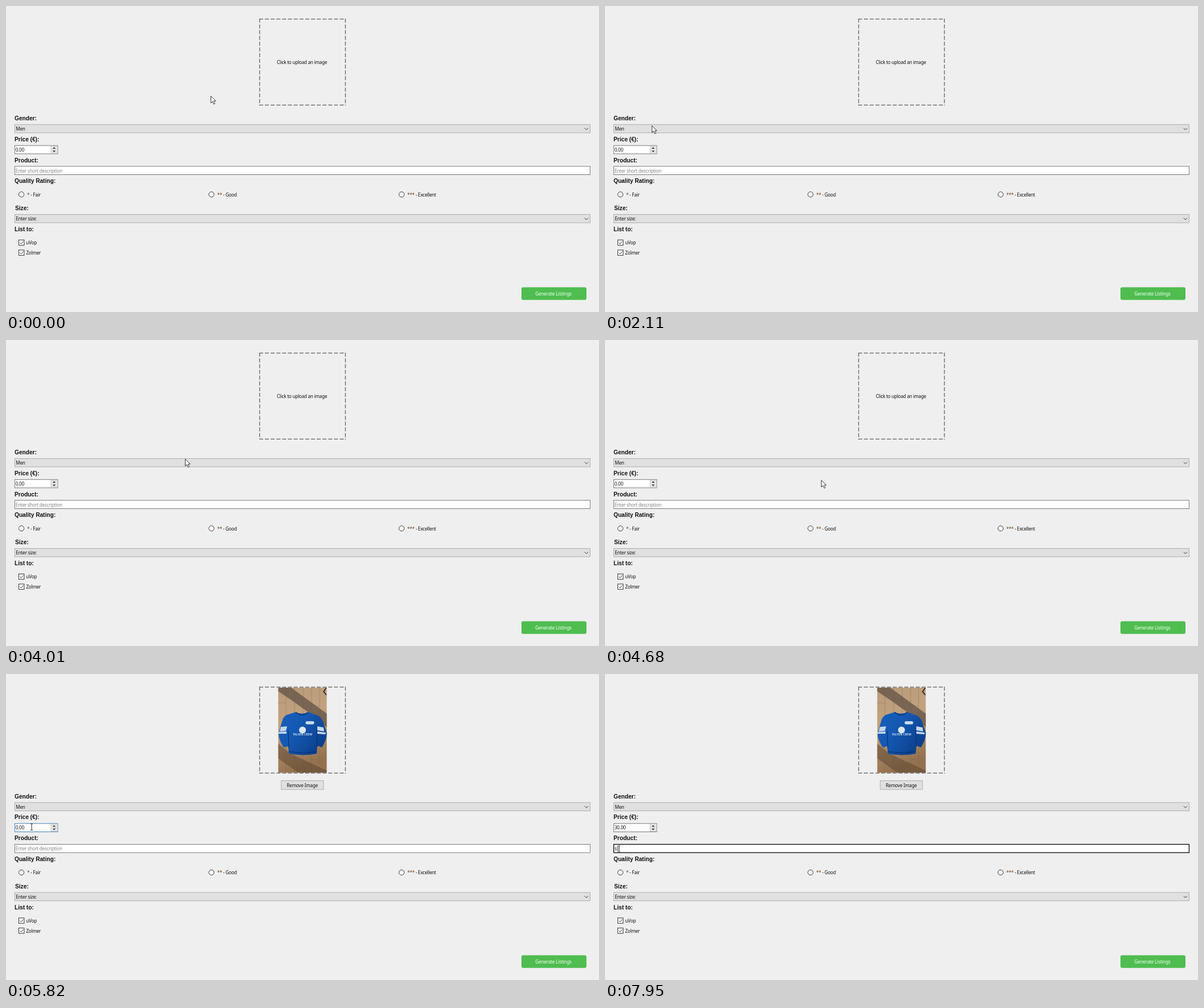
Recreate the animation shown at these times as an HTML page. Size 1040 by 538 pixels, loop 8000 ms.

```html
<!DOCTYPE html>
<html lang="en">
<head>
<meta charset="utf-8">
<title>Listing form</title>
<style>
  html, body { margin: 0; width: 100%; height: 100%; overflow: hidden; background: #efefef; }
  svg { display: block; width: 100%; height: 100%; }
  text { font: 8.2px "Noto Sans", "Open Sans", sans-serif; letter-spacing: -.27px; fill: #14141c; white-space: pre; }
  .head { font: bold 10.15px "Liberation Sans", Arial, sans-serif; letter-spacing: 0; fill: #111; }
  .mid { text-anchor: middle; }
  .combo { fill: #e0e0e0; stroke: #adadad; }
  .combo.hot { fill: #e4f0fa; stroke: #2f6fa6; }
  .edit { fill: #fff; stroke: #7a7a7a; }
  .edit.focus { stroke: #151515; stroke-width: 1.4; }
  .edit.blue { stroke: #3c82bf; }
  .line { fill: none; stroke: #333; }
</style>
</head>
<body>
<svg id="stage" viewBox="0 0 1040 538" preserveAspectRatio="none">
  <defs>
    <linearGradient id="wood" x2=".25" y2="1">
      <stop offset="0" stop-color="#b89a7a"/><stop offset=".45" stop-color="#c2a27e"/>
      <stop offset="1" stop-color="#94714e"/>
    </linearGradient>
    <linearGradient id="wool" x2="1" y2=".6">
      <stop offset="0" stop-color="#1760bd"/><stop offset=".5" stop-color="#1457b0"/>
      <stop offset="1" stop-color="#0c3f8c"/>
    </linearGradient>
    <clipPath id="crop"><path d="M477.5 24h85v149.5h-85z"/></clipPath>
  </defs>

  <path d="M444 23H596M444 174.2H596M444.8 22.3V175M595.3 22.3V175" class="line"
        style="stroke:#757575;stroke-width:1.5;stroke-dasharray:7 3.1"/>
  <text id="hint" class="mid" x="519" y="102">Click to upload an image</text>

  <g id="photo">
    <g clip-path="url(#crop)">
      <path d="M477 24h86v150h-86z" fill="url(#wood)"/>
      <path d="M491 24V174M506 24V174M521 24V174M536 24V174M550 24V174M477 51h14M506 44h15M536 56h14M477 152h14M506 160h15M536 150h14"
            class="line" style="stroke:#7d6049;stroke-width:.6;opacity:.6"/>
      <path d="M477 24h23l63 46v24l-18-16-40-29-28-19z" fill="#5f5044" opacity=".72"/>
      <path d="M477 122l22 18 64 30v4h-50l-36-26z" fill="#594430" opacity=".5"/>
      <path d="M562 24l-5 7 5 6" class="line" style="stroke:#211d1a;stroke-width:1.6"/>
      <path d="M508 67q11 5 22 0l17 6q8 5 10 14l6 17q-1 13-9 25l-8-3-1 14q-25 5-49 0l-1-13-8 2q-9-14-9-25l6-20q2-9 8-12z"
            fill="url(#wool)"/>
      <path d="M508 67q11 10 22 0M495 99l1 31M545 99l1 29M496 136q25 5 49 0" class="line"
            style="stroke:#092f6c;stroke-width:1.1"/>
      <rect x="525.5" y="83" width="15" height="5.4" rx="2.6" fill="#c9dbea"/>
      <circle cx="520" cy="98.5" r="6" fill="#dce8f0"/>
      <path d="M482 93l11-1-2 8-11 1zM546 92l11 2 1 7-12-2zM478 102l14-1v4h-14zM546 101l15 2-1 3-14-1z" fill="#c5d7e8"/>
      <text class="mid" x="520" y="108.3" style="font-size:4.6px;font-weight:700;letter-spacing:.25px;fill:#d5e3ef">TALVEN CREW</text>
    </g>
    <rect class="combo" x="482.8" y="187.5" width="74" height="15.5"/>
    <text class="mid" x="519.5" y="198.8">Remove Image</text>
  </g>

  <g id="form"></g>

  <rect x="904" y="494.5" width="114" height="22.3" rx="3" fill="#4fbd50"/>
  <text class="mid" x="960" y="509" style="fill:#f3fff3;letter-spacing:-.22px">Generate Listings</text>

  <g id="arrow">
    <path d="M.4.4V12.6L3.3 9.9 5.4 14.6 7.4 13.7 5.4 9.1H9.1Z" fill="#fff" stroke="#222" stroke-width=".9"/>
  </g>
  <g id="hand">
    <path d="M0 10V1.5Q0 0 1.3 0T2.6 1.5V6.3Q3.8 5.5 4.9 6.8 6 6 7.1 7.3 8.8 6.8 9 8.8V12.5Q9 14.5 7.7 16V17.8H1.5V16Q-.6 13.6-3.4 10.3-4 8.6-2.2 8.7Z"
          fill="#fff" stroke="#222" stroke-width=".95"/>
    <path d="M2.6 6V9.5M4.9 6.8V9.7M7.1 7.3V9.9" class="line" style="stroke-width:.8"/>
  </g>
  <path id="beam" class="line" d="M-2-5.6H-.6L0-5 .6-5.6H2M0-5V5M-2 5.6H-.6L0 5 .6 5.6H2" style="stroke:#222"/>
</svg>

<script>
const LOOP = 8000, SHIFT = 17.6;
const T = { image: 4960, price: 5350, digit: 6200, product: 6640, letter: 7700 };
const el = id => document.getElementById(id);

const head = (x, y, s) => `<text class="head" x="${x}" y="${y}">${s}</text>`;
const text = (x, y, s, attr = '') => `<text x="${x}" y="${y}" ${attr}>${s}</text>`;
const combo = (id, y, s) =>
  `<rect id="${id}" class="combo" x="15.4" y="${y}" width="1009" height="14.6"/>` +
  text(17.3, y + 10.8, s) +
  `<path class="line" d="M1014.8 ${y + 6.2}l3.1 3.1 3.1-3.1"/>`;
const radio = (x, stars, s) =>
  `<circle cx="${x}" cy="331.3" r="4.6" fill="#fff" stroke="#333"/>` +
  text(x + 10, 334.5, `<tspan fill="#71400f">${stars}</tspan> - ${s}`);
const check = (y, s) =>
  `<rect x="22.4" y="${y - 4.7}" width="9.4" height="9.4" fill="#fff" stroke="#333"/>` +
  `<path class="line" d="M24.4 ${y}l2.1 2.3 3.9-4.6"/>` + text(35.2, y + 3.3, s);

el('form').innerHTML =
  head(15, 201, 'Gender:') + combo('gender', 208.4, 'Men') +
  head(15, 237.7, 'Price (€):') +
  '<rect id="price" class="edit" x="15.4" y="245.3" width="75.4" height="14.6"/>' +
  '<rect x="79" y="246" width="11.4" height="13.2" fill="#e4e4e4" stroke="#b5b5b5" stroke-width=".7"/>' +
  '<path d="M81.7 251l2.7-2.8 2.7 2.8zM81.7 254.2l2.7 2.8 2.7-2.8z" fill="#333"/>' +
  text(16.7, 255.8, '', 'id="amount"') +
  head(15, 274.5, 'Product:') +
  '<rect id="product" class="edit" x="15.4" y="281.9" width="1009" height="14.6"/>' +
  text(16.7, 292.7, 'Enter short description', 'id="holder" style="fill:#848484"') +
  text(16.8, 292.7, 's', 'id="typed"') +
  '<path id="caret" class="line" d="M0 284.6V294.4" style="stroke:#111;stroke-width:.9"/>' +
  head(15, 311, 'Quality Rating:') +
  radio(27, '*', 'Fair') + radio(360.4, '**', 'Good') + radio(693.8, '***', 'Excellent') +
  head(16, 359, 'Size:') + combo('size', 366.5, 'Enter size:') +
  head(15, 396, 'List to:') + check(416, 'uVop') + check(433.7, 'Zolmer');

// time, x, y of the pointer's hot spot
const path = [
  [0, 359, 158], [20, 359, 158], [820, 480, 105], [840, 480, 105], [1480, 80, 180],
  [1810, 80, 180], [1910, 82, 210], [2110, 82, 210], [2830, 75, 218], [2990, 75, 218],
  [3130, 75, 218], [3790, 352, 123], [4010, 314, 209], [4410, 380, 256], [4580, 380, 256],
  [4680, 379, 246], [4960, 379, 246], [5080, 221, 230], [5350, 45, 269], [6380, 45, 269],
  [6600, 24.8, 307.4], [LOOP, 24.8, 307.4]
];
// time from which each pointer shape is used
const shapes = [[0, 'arrow'], [500, 'hand'], [950, 'arrow'], [2700, 'hand'], [3400, 'arrow'], [5300, 'beam']];

const pointer = t => {
  const i = path.findIndex(k => k[0] > t);
  const [t0, x0, y0] = path[i - 1], [t1, x1, y1] = path[i];
  const u = (t - t0) / (t1 - t0), e = u * u * (3 - 2 * u);
  return [x0 + (x1 - x0) * e, y0 + (y1 - y0) * e];
};
const show = (id, on) => { el(id).style.display = on ? '' : 'none'; };
const flag = (id, name, on) => el(id).classList.toggle(name, on);

function draw(t) {
  const loaded = t >= T.image, typed = t >= T.letter;
  const [x, y] = pointer(t);
  const shape = shapes.filter(s => s[0] <= t).pop()[1];
  for (const id of ['arrow', 'hand', 'beam']) show(id, id === shape);
  el(shape).setAttribute('transform', `translate(${x} ${y})`);

  show('photo', loaded);
  show('hint', !loaded);
  el('form').setAttribute('transform', `translate(0 ${loaded ? SHIFT : 0})`);
  flag('gender', 'hot', loaded && y > 225 && y < 241);
  flag('price', 'blue', t >= T.price && t < 6900);
  flag('product', 'focus', t >= T.product);
  el('amount').textContent = t < T.digit ? '0.00' : '30.00';
  show('holder', !typed);
  show('typed', typed);
  show('caret', t >= T.product && (t < 7140 || t >= 7600));
  el('caret').setAttribute('transform', `translate(${typed ? 22 : 17.8} 0)`);
}

const start = performance.now();
function tick() {
  draw((performance.now() - start) % LOOP);
  requestAnimationFrame(tick);
}
tick();
</script>
</body>
</html>
```
